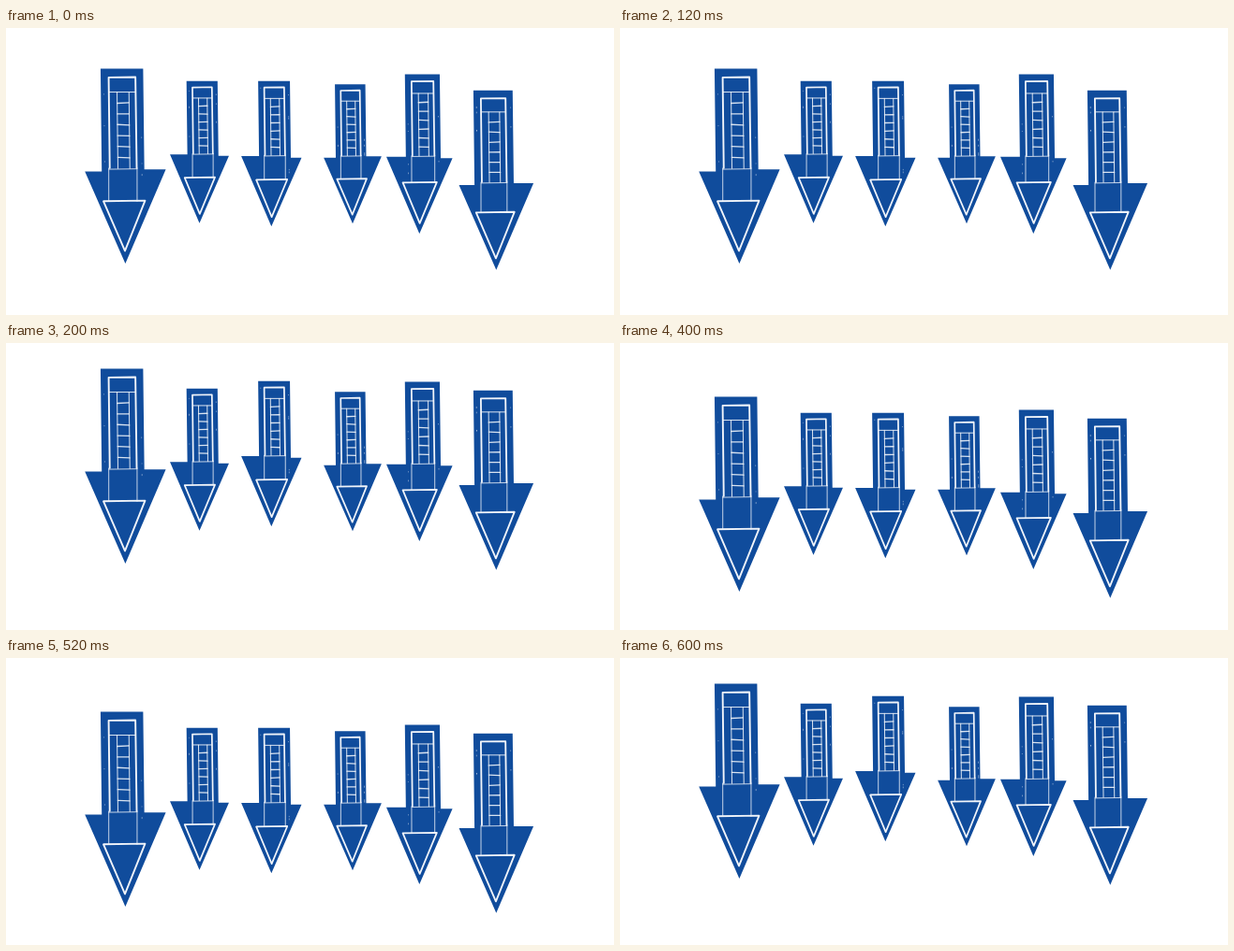
Animation, 649 px wide and 307 px high, one loop 0.8 s. Source, as an HTML page with a canvas:

```html
<!DOCTYPE html>
<html lang="en">
<head>
<meta charset="utf-8">
<title>Bouncing arrows</title>
<style>
html, body { margin: 0; width: 100%; height: 100%; overflow: hidden; background: #fff; }
canvas { display: block; }
</style>
</head>
<body>
<canvas id="stage" width="649" height="307"></canvas>
<script>
const ctx = document.getElementById('stage').getContext('2d');
const BLUE = '#104c9c', CHALK = '#f0f4fa';
const STEP = 200;

// x: tip, y: top edge, h: height, lean: side the shaft sits on,
// up / down: vertical travel from the resting place
const arrows = [
  { x: 127.4, y: 43.5, h: 208.5, lean: -1, up: -16, down: 14 },
  { x: 206.5, y: 56.7, h: 152,   lean: 1,  up: -8,  down: 18 },
  { x: 283.3, y: 56.7, h: 155.5, lean: 1,  up: -16, down: 18 },
  { x: 370,   y: 60.3, h: 149,   lean: -1, up: -8,  down: 18 },
  { x: 441.3, y: 49.5, h: 170.5, lean: 1,  up: -8,  down: 22 },
  { x: 523.3, y: 66.8, h: 192,   lean: -1, up: -16, down: 14 }
];

function random(seed) {
  return () => (seed = seed * 16807 % 2147483647) / 2147483647;
}

function trace(points, closed) {
  ctx.beginPath();
  points.forEach(([x, y]) => ctx.lineTo(x, y));
  if (closed) ctx.closePath();
}

function stroke(width, points, closed) {
  ctx.lineWidth = width;
  trace(points, closed);
  ctx.stroke();
}

function drawArrow({ x, y, h, lean }, index) {
  const rand = random(index * 977 + 41);
  // positions in units of the arrow's height, from the tip's axis and from the top
  const at = (u, v) => [x + u * h, y + v * h];
  // the same, from the axis of the shaft, which drifts right on its way down
  const shaft = (u, v) => at(u + lean * .018 + .012 * Math.min(v, .52), v);
  const shoulder = side => .522 + lean * side * .005;

  ctx.fillStyle = BLUE;
  trace([
    shaft(-.109, 0), shaft(.109, 0),
    shaft(.109, shoulder(1)), at(.207, shoulder(1)),
    at(0, 1),
    at(-.207, shoulder(-1)), shaft(-.109, shoulder(-1))
  ], true);
  ctx.fill();

  ctx.strokeStyle = CHALK;
  ctx.lineJoin = ctx.lineCap = 'round';
  const bold = 1.2 + h / 300, thin = 1;

  // window frame, and its sides running into the head
  stroke(bold, [shaft(-.068, .51), shaft(-.068, .045), shaft(.069, .043), shaft(.07, .51)]);
  ctx.globalAlpha = .8;
  for (const side of [-.073, .072]) stroke(thin, [shaft(side, .51), shaft(side, .68)]);
  stroke(thin, [shaft(-.073, .516), shaft(.072, .514)]);

  // ladder of seven cells
  ctx.globalAlpha = .9;
  const first = .12, last = .512, left = -.026, right = .035;
  stroke(thin, [shaft(-.068, first), shaft(.069, first)]);
  for (const side of [left, right]) stroke(thin, [shaft(side, first), shaft(side, last)]);
  for (let i = 1; i < 7; i++) {
    const v = first + (last - first) * i / 7, tilt = (rand() - .5) * .003;
    stroke(thin + .3, [shaft(left, v - tilt), shaft(right, v + tilt)]);
  }
  ctx.globalAlpha = 1;

  // triangle in the head
  const mid = lean * .004;
  stroke(bold, [at(mid - .108, .68), at(mid + .105, .677), at(mid / 2, .935)], true);

  // worn print flecks
  ctx.fillStyle = 'rgba(255,255,255,.5)';
  for (let i = 0; i < 6; i++) {
    const side = rand() < .5 ? -.095 : .095;
    ctx.fillRect(...shaft(side, .04 + rand() * .6), .8, .8 + rand() * 1.4);
  }
}

function frame(now) {
  const beat = Math.floor(now / STEP) % 4;
  ctx.fillStyle = '#fff';
  ctx.fillRect(0, 0, 649, 307);
  arrows.forEach((arrow, i) => {
    ctx.save();
    ctx.translate(0, [0, arrow.up, arrow.down, arrow.up][beat]);
    drawArrow(arrow, i);
    ctx.restore();
  });
  requestAnimationFrame(frame);
}

requestAnimationFrame(frame);
</script>
</body>
</html>
```
